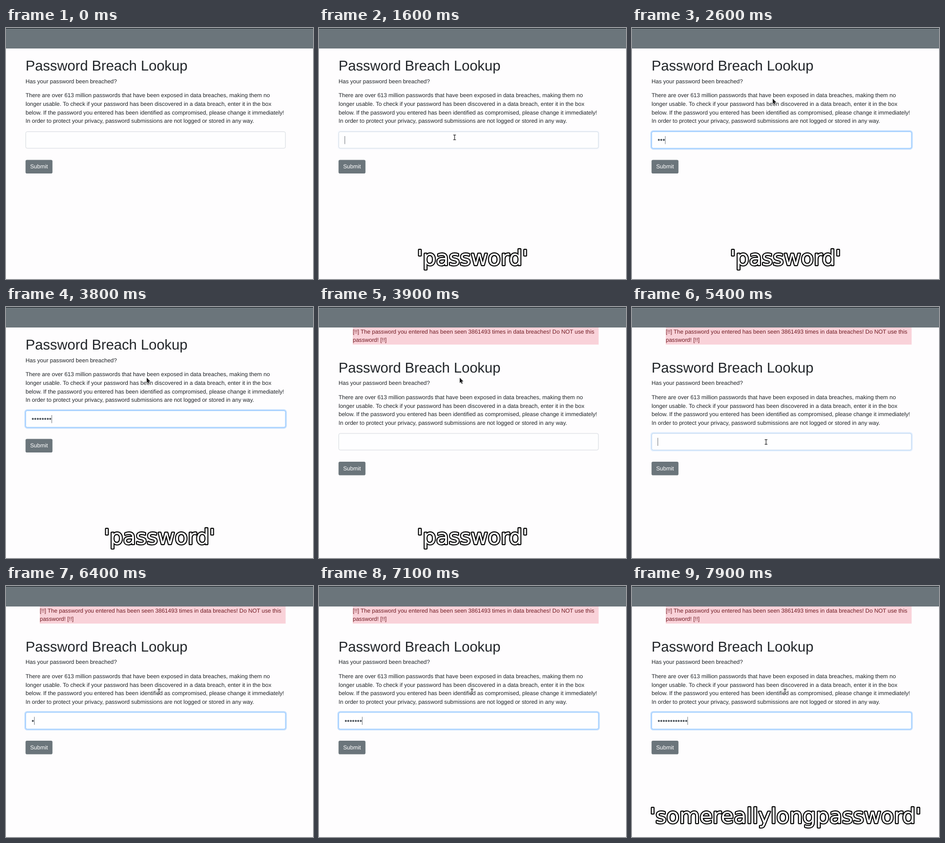
These frames come from a looping animation (600 by 490 pixels, 8000 ms). An HTML page with a canvas:

```html
<!DOCTYPE html>
<html lang="en">
<head>
<meta charset="utf-8">
<title>Password Breach Lookup</title>
<style>
  html, body { margin: 0; width: 100%; height: 100%; overflow: hidden; background: #fefdfe; }
  canvas { display: block; }
</style>
</head>
<body>
<canvas id="stage" width="600" height="490"></canvas>
<script>
const ctx = document.getElementById('stage').getContext('2d');
const LOOP = 8000, STEP = 100, BLINK = 550;
const SANS = '"Liberation Sans", Arial, sans-serif';
const REM = 16 * 25 / 36;
const LINE = REM * 1.5;
const LEFT = 38.2, RIGHT = 546.5;
const INK = '#212529', GREY = '#6b757b';

const RESULT_AT = 3900;
const FIELDS = [
  { focus: 1570, end: RESULT_AT, keys: [2400, 2500, 2600, 2700, 2900, 3000, 3100, 3200] },
  { focus: 5330, end: LOOP, keys: [6400, 6500, 6600, 6700, 6800, 7000, 7100, 7300, 7400, 7600, 7700, 7900] }
];
const CAPTIONS = [
  { from: 1500, to: 5000, text: "'password'" },
  { from: 7500, to: LOOP, text: "'somereallylongpassword'" }
];
// time, x, y, pointer shape
const PATH = [
  [700, 413, 278, arrow], [900, 308, 237, arrow], [1100, 308, 237, arrow],
  [1200, 289, 208, beam], [1300, 289, 208, beam], [1400, 265, 213.5, beam],
  [1700, 265, 213.5, beam], [2000, 275, 138, arrow], [4700, 275, 138, arrow],
  [5100, 262, 255, beam], [5200, 262, 255, beam], [5300, 262, 263.5, beam],
  [5400, 262, 263.5, beam], [5600, 299, 206, beam]
];
const INTRO = [
  'There are over 613 million passwords that have been exposed in data breaches, making them no',
  'longer usable. To check if your password has been discovered in a data breach, enter it in the box',
  'below. If the password you entered has been identified as compromised, please change it immediately!',
  'In order to protect your privacy, password submissions are not logged or stored in any way.'
];
const ALERT = [
  '[!!] The password you entered has been seen 3861493 times in data breaches! Do NOT use this',
  'password! [!!]'
];

const lerp = (a, b, p) => a + (b - a) * p;
const clamp = p => Math.max(0, Math.min(1, p));
const ease = p => p * p * (3 - 2 * p);
const mix = (a, b, p) => `rgb(${a.map((v, i) => Math.round(lerp(v, b[i], p)))})`;

function text(str, x, y, size = REM, color = INK) {
  ctx.font = `${size}px ${SANS}`;
  ctx.fillStyle = color;
  ctx.fillText(str, x, y);
}

function rect(x, y, w, h, color) {
  ctx.fillStyle = color;
  ctx.fillRect(x, y, w, h);
}

function roundBox(x, y, w, h, r) {
  ctx.beginPath();
  ctx.roundRect(x, y, w, h, r);
}

function drawField(t) {
  const top = 202, w = RIGHT - LEFT, h = 33.2;
  const field = FIELDS.find(f => t < f.end);
  const glow = ease(clamp((t - field.focus) / 150));
  if (glow > 0) {
    roundBox(LEFT - 2.2, top - 2.2, w + 4.4, h + 4.4, 5.4);
    ctx.fillStyle = `rgba(0,123,255,${0.25 * glow})`;
    ctx.fill();
  }
  roundBox(LEFT + 0.4, top + 0.4, w - 0.8, h - 0.8, 3);
  ctx.fillStyle = '#fefeff';
  ctx.fill();
  ctx.lineWidth = 0.85;
  ctx.strokeStyle = mix([206, 212, 218], [128, 189, 255], glow);
  ctx.stroke();
  if (t < field.focus) return;

  const typed = field.keys.filter(k => k <= t).length;
  const size = REM * 1.25;
  text('•'.repeat(typed), 50, 223.3, size, '#495057');
  if (typed || (t - field.focus) % (2 * BLINK) < BLINK) {
    rect(50.1 + typed * size * 0.35, 211, 0.75, 15.6, '#495057');
  }
}

function drawPage(t) {
  rect(0, 0, 600, 490, '#fefdfe');
  const result = t >= RESULT_AT;
  if (result) {
    rect(66, 40, RIGHT - 66, 33.4, '#f9d2d9');
    ALERT.forEach((s, i) => text(s, 66, 51.8 + i * LINE, REM, '#721c24'));
  }
  rect(0, 0, 600, 40, GREY);
  rect(0, 0, 600, 1, '#10161c');

  ctx.save();
  ctx.translate(0, result ? REM * 4 : 0);
  text('Password Breach Lookup', LEFT, 83.1, REM * 2.5);
  text('Has your password been breached?', LEFT, 107.6);
  INTRO.forEach((s, i) => text(s, LEFT, 135.4 + i * LINE));
  drawField(t);
  roundBox(LEFT, 257.6, 52.6, 26.4, 2.8);
  ctx.fillStyle = GREY;
  ctx.fill();
  text('Submit', 47.2, 274.4, REM, '#fff');
  ctx.restore();
}

function arrow() {
  ctx.beginPath();
  [[0, 0], [0, 10.2], [2.3, 8.2], [4, 12], [5.7, 11.2], [4.1, 7.6], [7.2, 7.3]]
    .forEach(([x, y]) => ctx.lineTo(x, y));
  ctx.closePath();
  ctx.lineWidth = 1.4;
  ctx.strokeStyle = '#fff';
  ctx.stroke();
  ctx.fillStyle = '#1c1c1e';
  ctx.fill();
}

function beam() {
  ctx.beginPath();
  ctx.moveTo(0, -4.6);
  ctx.lineTo(0, 4.6);
  for (const y of [-4.6, 4.6]) {
    ctx.moveTo(-2.6, y);
    ctx.lineTo(2.6, y);
  }
  for (const [width, color] of [[2.6, '#fff'], [1.2, '#2a2a2c']]) {
    ctx.lineWidth = width;
    ctx.strokeStyle = color;
    ctx.stroke();
  }
}

function drawPointer(t) {
  if (t < PATH[0][0]) return;
  const i = PATH.findLastIndex(k => k[0] <= t);
  const [t0, x0, y0, shape] = PATH[i];
  const [t1, x1, y1] = PATH[i + 1] || [LOOP, x0, y0];
  const p = (t - t0) / (t1 - t0);
  ctx.save();
  ctx.translate(lerp(x0, x1, p), lerp(y0, y1, p));
  shape();
  ctx.restore();
}

function drawCaption(t) {
  const caption = CAPTIONS.find(c => t >= c.from && t < c.to);
  if (!caption) return;
  ctx.save();
  ctx.font = '41px "DejaVu Sans", sans-serif';
  ctx.textAlign = 'center';
  ctx.lineJoin = 'round';
  ctx.lineWidth = 4;
  ctx.strokeStyle = '#000';
  ctx.strokeText(caption.text, 300, 463);
  ctx.fillStyle = '#fff';
  ctx.fillText(caption.text, 300, 463);
  ctx.restore();
}

const start = performance.now();
function frame() {
  const t = Math.floor((performance.now() - start) % LOOP / STEP) * STEP;
  ctx.textRendering = 'geometricPrecision';
  drawPage(t);
  drawPointer(t);
  drawCaption(t);
  requestAnimationFrame(frame);
}
frame();
</script>
</body>
</html>
```
